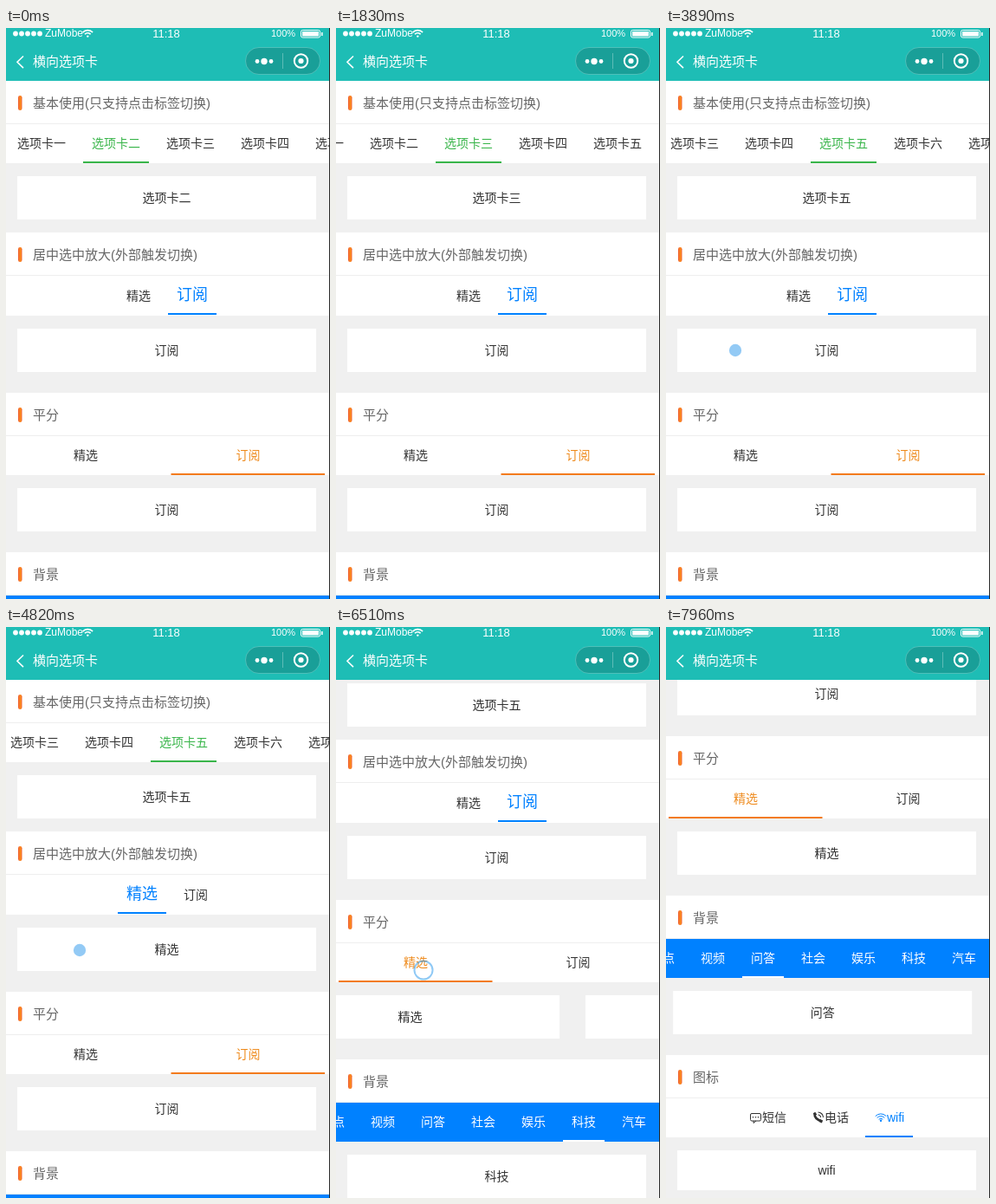
Recreate the animation shown at these times as an HTML page with a canvas. Size 374 px wide and 659 px high, loop 8 s.

```html
<!DOCTYPE html>
<html lang="zh-CN">
<head>
<meta charset="utf-8">
<style>
  html, body { margin: 0; height: 100%; overflow: hidden; background: #f0f0f0; }
  canvas { display: block; }
</style>
</head>
<body>
<canvas width="374" height="659"></canvas>
<script>
const ctx = document.querySelector('canvas').getContext('2d');
const LOOP = 8000, PAGE = 375, CENTER = 185.5;
const DARK = '#333', GREEN = '#39b54a', BLUE = '#0081ff', ORANGE = '#f37b1d', GOLD = '#ee8a1c';

const clamp = v => Math.max(0, Math.min(1, v));
const easeOut = p => 1 - (1 - p) ** 2;
const easeInOut = p => (1 - Math.cos(Math.PI * p)) / 2;

// Moves are [start time, target] pairs.
const follow = (t, from, moves, duration, ease = easeOut) =>
  moves.reduce((v, [start, to]) => v + (to - v) * ease(clamp((t - start) / duration)), from);
const current = (t, from, moves) =>
  moves.reduce((v, [start, to]) => t >= start ? to : v, from);
const delay = (moves, ms) => moves.map(([start, to]) => [start + ms, to]);

const basicMoves = [[690, 0], [1490, 2], [2190, 3], [2985, 4]];
const zoomMoves = [[4090, 0], [5020, 1]];
const halfMoves = [[6350, 0]];
const channelMoves = [[7660, 2]];

// start, x, y, hold time, horizontal drag
const touches = [
  [690, 45, 132, 90, 0], [1490, 213, 132, 90, 0], [2190, 239, 132, 90, 0], [2985, 273, 136, 90, 0],
  [3890, 80, 372, 200, 260], [4820, 85, 373, 200, 255],
  [6350, 101, 396, 90, 0], [7655, 88, 383, 90, 0]
];

const basicTabs = [...'一二三四五六七八'].map(n => '选项卡' + n);
const pair = ['精选', '订阅'];
const channels = ['热点', '视频', '问答', '社会', '娱乐', '科技', '汽车'];

function rect(x, y, w, h, color) {
  ctx.fillStyle = color;
  ctx.fillRect(x, y, w, h);
}

function rounded(x, y, w, h, r, fill, stroke) {
  ctx.beginPath();
  ctx.roundRect(x, y, w, h, r);
  if (fill) { ctx.fillStyle = fill; ctx.fill(); }
  if (stroke) { ctx.strokeStyle = stroke; ctx.lineWidth = 1; ctx.stroke(); }
}

function dot(x, y, r, color) {
  ctx.beginPath();
  ctx.arc(x, y, r, 0, 7);
  ctx.fillStyle = color;
  ctx.fill();
}

function arc(x, y, r, color, width, from = 0, to = 2 * Math.PI) {
  ctx.beginPath();
  ctx.arc(x, y, r, from, to);
  ctx.strokeStyle = color;
  ctx.lineWidth = width;
  ctx.stroke();
}

function path(d, color, width) {
  ctx.strokeStyle = color;
  ctx.lineWidth = width;
  ctx.stroke(new Path2D(d));
}

function text(str, x, y, size = 14, color = DARK, align = 'center') {
  ctx.font = `${size}px "Liberation Sans", "Noto Sans CJK SC", "Noto Sans CJK", sans-serif`;
  ctx.textAlign = align;
  ctx.fillStyle = color;
  ctx.fillText(str, x, Math.round(y + size * 0.36));
}

function wifi(x, y, radii, color, width) {
  radii.forEach(r => arc(x, y, r, color, width, -Math.PI * 0.76, -Math.PI * 0.24));
  dot(x, y - 0.8, 1.2, color);
}

function heading(y, title) {
  rect(0, y, 374, 95, '#fff');
  rect(0, y + 49, 374, 1, '#eee');
  const g = ctx.createLinearGradient(14, 0, 19, 0);
  g.addColorStop(0, '#ee5a32');
  g.addColorStop(0.5, '#fb8a1e');
  g.addColorStop(1, '#ee5a32');
  rounded(14, y + 17, 4.5, 17, 2.2, g);
  text(title, 31, y + 25.5, 15, '#666', 'left');
}

function cards(y, names, position = 0, height = 50) {
  names.forEach((name, i) => {
    const shift = (i - position) * PAGE;
    rect(13 + shift, y, 345, height, '#fff');
    text(name, CENTER + shift, y + height / 2);
  });
}

function basicSection(t) {
  heading(61, '基本使用(只支持点击标签切换)');
  const moves = delay(basicMoves, 30);
  const scroll = follow(t, 0, moves.map(([s, i]) => [s, Math.max(0, 60 * (i - 1))]), 300, easeInOut);
  const active = current(t, 1, moves);
  basicTabs.forEach((name, i) => text(name, 41 + 86 * i - scroll, 133, 14, i === active ? GREEN : DARK));
  rect(3 + 86 * follow(t, 1, moves, 150) - scroll, 154, 76, 2, GREEN);
  cards(171, [basicTabs[current(t, 1, basicMoves)]]);
}

function zoomSection(t) {
  heading(236, '居中选中放大(外部触发切换)');
  rect(0, 331, 374, 1, '#fff');
  const k = follow(t, 1, zoomMoves, 180);
  const active = current(t, 1, zoomMoves);
  const sizes = [18 - 4 * k, 14 + 4 * k];
  const lefts = [129, 159 + 2 * sizes[0]];
  pair.forEach((name, i) =>
    text(name, lefts[i] + 10, 314 - sizes[i] * 0.36, sizes[i], i === active ? BLUE : DARK, 'left'));
  rect(lefts[0] + (lefts[1] - lefts[0]) * k, 329, 56, 2, BLUE);
  cards(347, [pair[active]]);
}

function halfSection(t) {
  heading(421, '平分');
  const active = current(t, 1, halfMoves);
  pair.forEach((name, i) => text(name, 92 + 187.5 * i, 493, 14, i === active ? GOLD : DARK));
  rect(3 + 187.5 * follow(t, 1, halfMoves, 150), 514, 177.5, 2, ORANGE);
  cards(531, pair, follow(t, 1, delay(halfMoves, 13), 306));
}

function channelSection(t) {
  heading(605, '背景');
  rect(0, 655, 374, 45, BLUE);
  channels.forEach((name, i) => text(name, -4 + 58 * i, 677, 14, '#fff'));
  rect(-28 + 58 * follow(t, 5, channelMoves, 150), 698, 48, 2, '#fff');
  cards(715, channels, follow(t, 5, delay(channelMoves, 15), 306));
}

function iconSection() {
  heading(789, '图标');
  rounded(97.5, 856.5, 12, 8.5, 1.5, null, DARK);
  path('M101 865l0 2.5 3-2.5', DARK, 1);
  [100.5, 103.5, 106.5].forEach(x => dot(x, 860.8, 0.8, DARK));
  text('短信', 111, 861, 14, DARK, 'left');
  path('M171.5 856q-.5 7 8.5 9.5', DARK, 2.6);
  path('M171 855.5l2 3M177 864.5l3.5 1.5', DARK, 3);
  [3, 6].forEach(r => arc(175.5, 861, r, DARK, 1.1, -Math.PI / 2, 0));
  text('电话', 183, 861, 14, DARK, 'left');
  wifi(248, 865.5, [3.2, 5.9, 8.6], BLUE, 1);
  text('wifi', 255, 861, 14, BLUE, 'left');
  rect(230, 882, 55, 2, BLUE);
  cards(899, ['wifi'], 0, 46);
}

function topBar() {
  rect(0, 0, 374, 61, '#1ebdb5');
  for (let i = 0; i < 5; i++) dot(11 + 7 * i, 6.5, 2.9, '#fff');
  text('ZuMobe', 45, 6, 12, '#fff', 'left');
  wifi(94.3, 10.4, [4.6, 7.8], '#fff', 1.7);
  text('11:18', 185, 6, 13, '#fff');
  text('100%', 306, 6, 11, '#fff', 'left');
  rounded(340.5, 2.5, 22, 8.5, 2, null, '#fff');
  rect(342, 4, 19, 5.5, '#fff');
  rect(364, 5, 1.5, 4, '#fff');
  path('M20 32.5l-7 6.8 7 6.8', '#fff', 1.6);
  text('横向选项卡', 31, 38.5, 15, '#fff', 'left');
  rounded(276.5, 22.5, 86, 31, 15.5, 'rgba(0,0,0,.16)', 'rgba(255,255,255,.22)');
  [[290, 2.4], [298, 3.7], [306, 2.4]].forEach(([x, r]) => dot(x, 38.5, r, '#fff'));
  rect(319, 29, 1, 18, 'rgba(255,255,255,.3)');
  arc(340.5, 38, 7.7, '#fff', 2);
  dot(340.5, 38, 3.1, '#fff');
}

function scrollBar(t, scroll) {
  const alpha = t < 5390 ? 0 : t < 6130 ? clamp((6130 - t) / 200)
    : t < 6810 ? 0 : clamp((7550 - t) / 200);
  rect(367, scroll * 0.69 - 3, 3, 455, `rgba(0,0,0,${0.3 * alpha})`);
}

function touch(t, [start, x, y, hold, drag]) {
  const age = t - start, p = (age - hold) / 140;
  if (age < 0 || p > 1) return;
  const cx = x + drag * easeInOut(clamp(age / hold));
  if (p < 0) dot(cx, y, 7 + 2 * clamp(age / 15), 'rgba(30,145,235,.48)');
  else arc(cx, y, 9 + 3 * p, `rgba(30,145,235,${0.5 * clamp(2 - 2 * p)})`, 2);
}

function draw(t) {
  const scroll = Math.round(
    106 * easeInOut(clamp((t - 5390) / 190)) + 189 * easeInOut(clamp((t - 6810) / 240)));
  rect(0, 0, 374, 659, '#f0f0f0');
  ctx.save();
  ctx.translate(0, -scroll);
  [basicSection, zoomSection, halfSection, channelSection, iconSection].forEach(section => section(t));
  ctx.restore();
  topBar();
  scrollBar(t, scroll);
  touches.forEach(item => touch(t, item));
  rect(373, 0, 1, 659, '#2a2a2a');
}

const begin = performance.now();
function tick() {
  draw((performance.now() - begin) % LOOP);
  requestAnimationFrame(tick);
}
tick();
</script>
</body>
</html>
```
